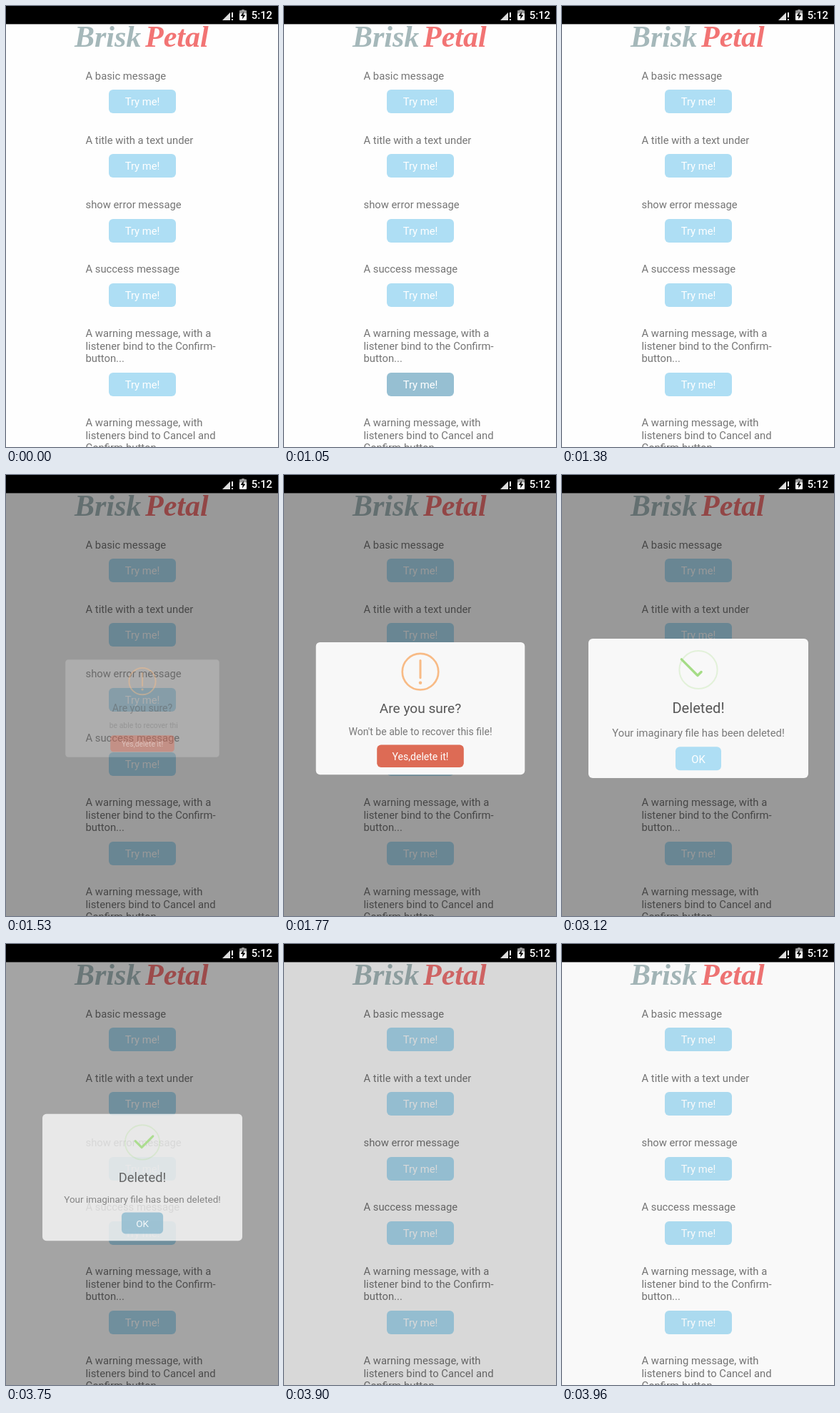
Animation of 381 by 617 pixels, one loop 4410 ms. Source, as an HTML page with a canvas:

```html
<!DOCTYPE html>
<html lang="en">
<head>
<meta charset="utf-8">
<title>Alert dialog demo</title>
<style>
html, body { margin: 0; width: 100%; height: 100%; overflow: hidden; background: #fefefe; }
canvas { display: block; }
</style>
</head>
<body>
<canvas id="stage" width="381" height="617"></canvas>
<script>
const ctx = document.getElementById('stage').getContext('2d');
const W = 381, H = 617, LOOP = 4410;
const SANS = 'Roboto, "Noto Sans", sans-serif';
const BLUE = '#aedef4', BLUE_DOWN = '#96bfd2', RED = '#dd6b55', RED_DOWN = '#cd5b55';
const ORANGE = '#f8bb86', GREEN = '#a5dc86', GREY = '#757575';
const CX = 191, DIALOG_Y = 326.5, ICON_Y = 272.5, ICON_R = 26.6;

const clamp = v => Math.min(1, Math.max(0, v));
const lerp = (a, b, p) => a + (b - a) * p;
const ease = p => (1 - Math.cos(Math.PI * clamp(p))) / 2;

function text(str, x, y, color, { size = 14.8, align = 'left', weight = 400, font } = {}) {
  ctx.font = font || `${weight} ${size}px ${SANS}`;
  ctx.textAlign = align;
  ctx.fillStyle = color;
  ctx.fillText(str, x, y);
}

function box(x, y, w, h, color, r = 6) {
  ctx.fillStyle = color;
  ctx.beginPath();
  ctx.roundRect(x, y, w, h, r);
  ctx.fill();
}

function poly(points, color) {
  ctx.fillStyle = color;
  ctx.beginPath();
  points.forEach(p => ctx.lineTo(...p));
  ctx.fill();
}

function stroke(points, color, width) {
  ctx.strokeStyle = color;
  ctx.lineWidth = width;
  ctx.lineCap = ctx.lineJoin = 'round';
  ctx.beginPath();
  points.forEach(p => ctx.lineTo(...p));
  ctx.stroke();
}

function arc(from, to, color, width) {
  ctx.strokeStyle = color;
  ctx.lineWidth = width;
  ctx.beginPath();
  ctx.arc(CX, ICON_Y, ICON_R, from, to);
  ctx.stroke();
}

function button(label, y, w, color) {
  box(CX - w / 2, y, w, 33, color);
  text(label, CX, y + 22.3, '#fff', { align: 'center' });
}

function statusBar() {
  ctx.fillStyle = '#000';
  ctx.fillRect(0, 0, W, 25.4);
  poly([[303, 20], [314, 9], [314, 20]], '#ddd');
  ctx.fillStyle = '#fff';
  ctx.fillRect(316, 9, 2, 7);
  ctx.fillRect(316, 18, 2, 2);
  box(327, 6.5, 10, 13.5, '#fff', 1);
  ctx.fillStyle = '#999';
  ctx.fillRect(330, 5, 4, 2);
  ctx.fillRect(327, 6.5, 10, 4);
  poly([[333, 8], [328.5, 14], [331.5, 14], [331, 18.5], [335.5, 12.5], [332.5, 12.5]], '#000');
  text('5:12', 373, 18, '#fff', { align: 'right', weight: 500 });
}

function page(t) {
  ctx.fillStyle = '#fefefe';
  ctx.fillRect(0, 0, W, H);
  const font = 'italic bold 42px "Liberation Serif", serif';
  text('Brisk', 96, 57, '#a5b8ba', { font });
  text('Petal', 195, 57, '#f27474', { font });

  const pressed = t >= 1050 && t < 1380;
  const rows = [
    ['A basic message'],
    ['A title with a text under'],
    ['show error message'],
    ['A success message'],
    ['A warning message, with a', 'listener bind to the Confirm-', 'button...'],
    ['A warning message, with', 'listeners bind to Cancel and', 'Confirm-button...']
  ];
  let y = 102.55;
  rows.forEach((lines, i) => {
    lines.forEach((line, n) => text(line, 111.5, Math.round(y + n * 17.4), GREY));
    y += (lines.length - 1) * 17.4;
    button('Try me!', Math.round(y + 14.7), 94, i === 4 && pressed ? BLUE_DOWN : BLUE);
    y += 90.2;
  });
}

// Pop-in bounce, then a shrinking fade on close.
function dialogPose(t) {
  if (t < 1650) return { scale: 0.7, alpha: 0.2, dim: 0.4 };
  if (t < 1830) {
    const s = t - 1530;
    const scale = s < 135 ? lerp(0.7, 1.05, ease(s / 135))
      : s < 240 ? lerp(1.05, 0.95, ease((s - 135) / 105))
      : lerp(0.95, 1, ease((s - 240) / 60));
    return { scale, alpha: 1, dim: 0.4 };
  }
  if (t < 3900) {
    const p = clamp((t - 3690) / 60) ** 2;
    return { scale: lerp(1, 0.909, p), alpha: lerp(1, 0.81, p), dim: lerp(0.4, 0.355, p) };
  }
  return { scale: 0.7, alpha: 0, dim: t < 3960 ? 0.15 : 0.02 };
}

function warningIcon() {
  arc(0, 2 * Math.PI, ORANGE, 2.8);
  stroke([[CX, 256], [CX, 281.5]], ORANGE, 3.2);
  ctx.fillStyle = ORANGE;
  ctx.beginPath();
  ctx.arc(CX, 288.8, 2.4, 0, 2 * Math.PI);
  ctx.fill();
}

function tick(t) {
  const p = t >= 3330 ? 1 : (t - 2602) / 750;
  if (p <= 0.54) return;
  const vx = 190, vy = 280.5, long = 32, d = Math.SQRT1_2;
  let start = long, end = 0;   // distances back from the corner
  let right = 33.5 * clamp((p - 0.65) / 0.19);
  if (p <= 0.7) {
    end = long * (1 - (p - 0.54) / 0.16);
  } else if (p <= 0.84) {
    start = Math.max(3.5, long * (1 - (p - 0.7) / 0.14));
  } else {
    const q = (p - 0.84) / 0.16;
    start = lerp(3.5, 14, q);
    right = lerp(33.5, 24.5, q);
  }
  const points = [start, end].map(n => [vx - n * d, vy - n * d]);
  if (right > 0 && end < 3) points.push([vx, vy], [vx + right * d, vy - right * d]);
  stroke(points, GREEN, 3.4);
}

function successIcon(t) {
  arc(0, 2 * Math.PI, 'rgba(165,220,134,.27)', 2);
  const p = (t - 2820) / 190;
  if (p >= 0 && p < 1) {
    const rad = q => lerp(60, -160, ease(q)) * Math.PI / 180;
    ctx.lineCap = 'butt';
    arc(rad(p * 1.3 + 0.15), rad(p * 1.3 - 0.3), GREEN, 2.6);
  }
  tick(t);
}

function dialog(t, { scale, alpha }) {
  const done = t >= 2520;
  ctx.save();
  ctx.translate(CX, DIALOG_Y);
  ctx.scale(scale, scale);
  ctx.translate(-CX, -DIALOG_Y);
  ctx.globalAlpha = alpha;
  box(37, 229, 308, 195, '#f8f8f8');
  ctx.globalAlpha = Math.sqrt(alpha);
  if (done) successIcon(t); else warningIcon();
  text(done ? 'Deleted!' : 'Are you sure?', CX, 333.3, '#575757', { size: 20.1, align: 'center' });

  ctx.save();
  if (t < 1650) {
    ctx.beginPath();
    ctx.rect(CX - 68, 340, 138, 40);
    ctx.clip();
  }
  text(done ? 'Your imaginary file has been deleted!' : "Won't be able to recover this file!",
    CX, 365.6, '#797979', { align: 'center' });
  ctx.restore();

  if (done) {
    const down = t < 2580 || t >= 3600;
    button('OK', 380.3, 64, down ? BLUE_DOWN : BLUE);
  } else {
    button('Yes,delete it!', 380.3, 128, t >= 2430 ? RED_DOWN : RED);
  }
  ctx.restore();
}

function draw(now) {
  const t = now % LOOP;
  page(t);
  if (t >= 1530) {
    const pose = dialogPose(t);
    ctx.fillStyle = `rgba(0,0,0,${pose.dim})`;
    ctx.fillRect(0, 25, W, H - 25);
    if (pose.alpha) dialog(t, pose);
  }
  statusBar();
}

let origin;
function frame(now) {
  origin ??= now;
  draw(now - origin);
  requestAnimationFrame(frame);
}
requestAnimationFrame(frame);
</script>
</body>
</html>
```
